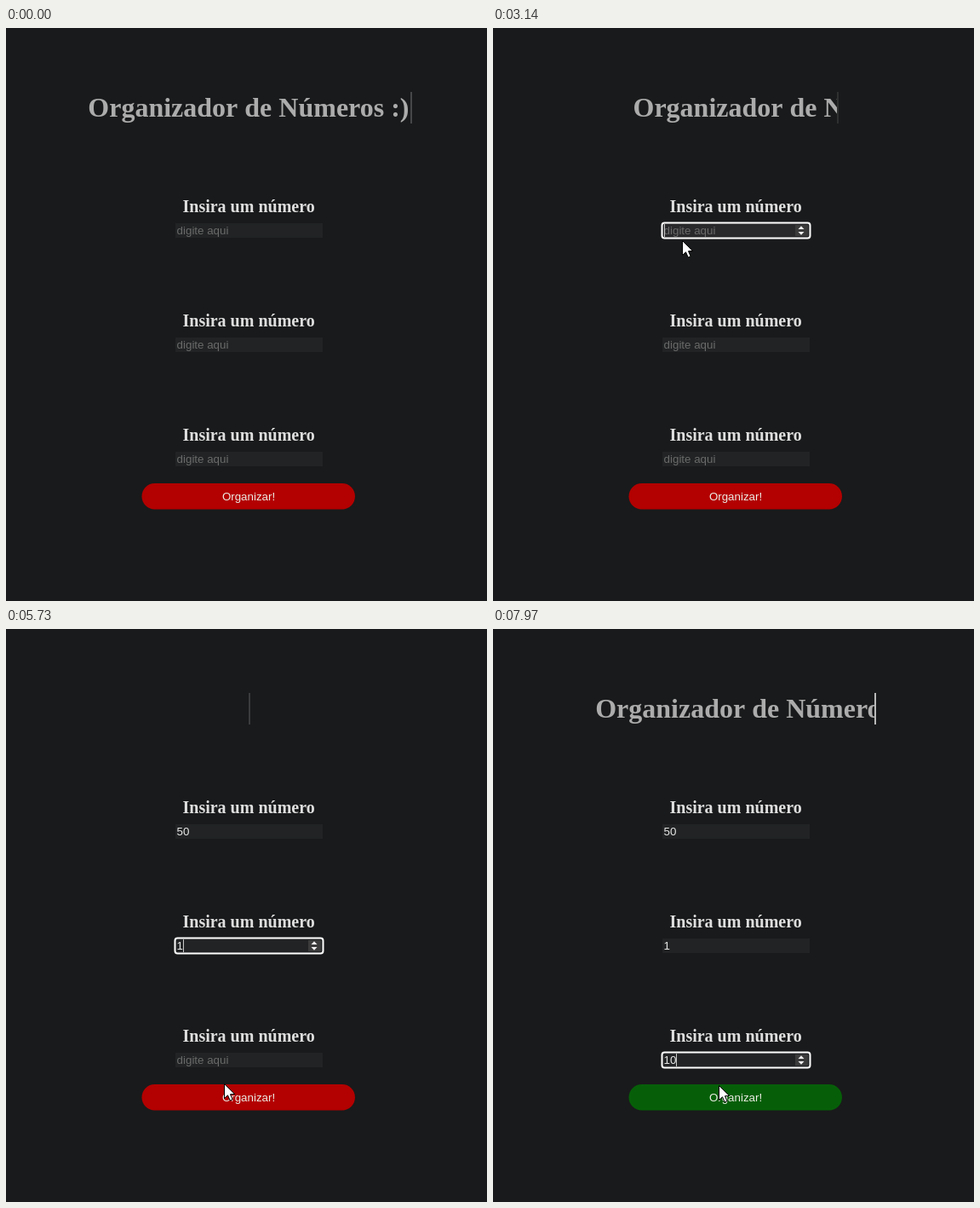
Write an HTML page with a canvas that moves like this. It is 565x672 px and loops after 8000 ms.

```html
<!DOCTYPE html>
<html lang="pt">
<head>
<meta charset="utf-8">
<title>Organizador</title>
<style>
  html, body { margin: 0; width: 100%; height: 100%; overflow: hidden; background: #191a1b; }
  canvas { display: block; }
</style>
</head>
<body>
<canvas id="stage" width="565" height="672"></canvas>
<script>
const ctx = document.getElementById('stage').getContext('2d');
const LOOP = 8000;
const SERIF = '"Liberation Serif", "Times New Roman", serif';
const SANS = '"Liberation Sans", Arial, sans-serif';
const TITLE = 'Organizador de Números :)';
const RED = [179, 0, 0], GREEN = [6, 95, 8];
const MOVE = 500, KEY = 180, FADE = 160;

// where the pointer comes to rest, and when
const STOPS = [
  { at: 0, x: 502, y: 690 },
  { at: 980, x: 215, y: 242 },
  { at: 2400, x: 217, y: 343 },
  { at: 3400, x: 223, y: 234 },
  { at: 4780, x: 243, y: 366 },
  { at: 5400, x: 250, y: 500 },
  { at: 5950, x: 257, y: 536 },
  { at: 7020, x: 246, y: 505 },
  { at: 7650, x: 265, y: 535 }
];

// focus time and what is typed into each field
const FIELDS = [
  { focus: 980, typing: 4080, value: '50' },
  { focus: 4800, typing: 5350, value: '1' },
  { focus: 7080, typing: 7420, value: '10' }
].map((f, i, all) => ({ ...f, y: 229 + 134 * i, blur: i < 2 ? all[i + 1].focus : LOOP }));

const clamp = v => Math.max(0, Math.min(1, v));
const easeOut = k => 1 - (1 - k) ** 3;
const mix = (a, b, k) => Math.round(a + (b - a) * k);

function text(str, x, y, font, color) {
  ctx.font = font;
  ctx.fillStyle = color;
  ctx.fillText(str, x, y);
}

function rect(x, y, w, h, color) {
  ctx.fillStyle = color;
  ctx.fillRect(x, y, w, h);
}

function rounded(x, y, w, h, r) {
  ctx.beginPath();
  ctx.roundRect(x, y, w, h, r);
}

function poly(points, color) {
  ctx.beginPath();
  points.forEach(([x, y]) => ctx.lineTo(x, y));
  ctx.closePath();
  ctx.fillStyle = color;
  ctx.fill();
}

// playback runs slightly slower than the 15 ticks per second of the page
function pageTime(t) {
  return Math.floor(Math.min(t / 66.9, (t + 80) / 70)) * 1000 / 15;
}

// 30 steps: type for 60 %, hold to 80 %, erase to 90 %, then empty
function typedSteps(s) {
  const p = ((s + 2460) % 4000) / 4000;
  if (p < 0.6) return Math.floor(p * 50);
  if (p < 0.8) return 30;
  return Math.max(0, 30 - Math.floor((p - 0.8) * 300));
}

function drawTitle(t) {
  const s = pageTime(t);
  const n = typedSteps(s);
  ctx.font = 'bold 32px ' + SERIF;
  const slack = Math.max(0, n * 380 / 30 - ctx.measureText(TITLE).width);
  const left = 284.8 - 6.33 * n + slack / 2;
  const caret = Math.round(284.6 + 6.3 * n + slack / 2);
  ctx.save();
  ctx.beginPath();
  ctx.rect(left, 70, caret - left, 50);
  ctx.clip();
  text(TITLE, left, 104, ctx.font, '#acacac');
  ctx.restore();
  const alpha = 0.75 * (1 - ((s + 370) % 500) / 500);
  rect(caret, 75, 2, 37, `rgba(255,255,255,${alpha})`);
}

function drawSpinner(y) {
  rect(355, y + 2, 15, 13, '#3b3b3b');
  for (const side of [-1, 1]) {
    const base = y + 8.5 + side * 1.5;
    poly([[358.5, base], [362, base + side * 3.7], [365.5, base]], '#f2f2f2');
  }
}

function drawField({ y, focus, blur, typing, value }, t) {
  const focused = t >= focus && t < blur;
  const count = Math.min(value.length, Math.max(0, Math.floor((t - typing) / KEY) + 1));
  const shown = value.slice(0, count);

  text('Insira um número', 207.5, y - 13, 'bold 20px ' + SERIF, '#dedede');
  rect(199, y, 173, 17, focused && !count ? '#29292c' : '#212324');
  if (focused) drawSpinner(y);
  text(shown || 'digite aqui', 200.6, y + 13, '13.333px ' + SANS, count ? '#e6e6e6' : '#6a6a6a');
  if (!focused) return;

  rounded(198.5, y - 0.5, 174, 18, 3);
  ctx.lineWidth = 2;
  ctx.strokeStyle = '#fff';
  ctx.stroke();
  const lastInput = count ? typing + (count - 1) * KEY : focus;
  if ((t - lastInput) % 1060 < 530) rect(201 + Math.round(count * 7.2), y + 1, 1, 15, '#c8c8c8');
}

function pointerAt(t) {
  const i = Math.max(1, STOPS.findLastIndex(s => t >= s.at - MOVE));
  const a = STOPS[i - 1], b = STOPS[i];
  const k = easeOut(clamp((t - b.at + MOVE) / MOVE));
  return [mix(a.x, b.x, k), mix(a.y, b.y, k)];
}

function onButton(t) {
  const [x, y] = pointerAt(t);
  return x >= 160 && x < 410 && y >= 534 && y < 564;
}

function drawButton(t) {
  // share of the last moments spent on the button gives the colour fade
  let k = 0;
  for (let i = 0; i < 16; i++) k += onButton(t - i * FADE / 16) / 16;
  rounded(159.5, 534, 250.5, 30.4, 15.2);
  ctx.fillStyle = `rgb(${RED.map((v, i) => mix(v, GREEN[i], k))})`;
  ctx.fill();
  text('Organizar!', 253.9, 554, '13.333px ' + SANS, '#ecece4');
}

function drawBeam(x, y) {
  rect(x, y - 7, 1, 15, '#dcdcdc');
  for (const dy of [-8, 8]) {
    rect(x - 3, y + dy, 3, 1, '#dcdcdc');
    rect(x + 1, y + dy, 3, 1, '#dcdcdc');
  }
}

function drawArrow(x, y) {
  const shape = [[0, 0], [0, 17], [4, 13.3], [6.7, 19.5], [9.6, 18.2], [7, 12.2], [12.2, 12]];
  poly(shape.map(([dx, dy]) => [x + dx + 0.5, y + dy + 0.5]), '#fff');
  ctx.lineWidth = 1;
  ctx.strokeStyle = '#000';
  ctx.stroke();
}

function drawPointer(t) {
  const [x, y] = pointerAt(t);
  if (FIELDS.some(f => t >= f.focus - 30 && t < f.focus + 100)) {
    ctx.beginPath();
    ctx.arc(x - 2, y - 1, 12, 0, 2 * Math.PI);
    ctx.fillStyle = 'rgba(196,188,10,0.72)';
    ctx.fill();
  }
  const overText = FIELDS.some(f =>
    (x > 198 && x < 373 && y >= f.y - 1 && y < f.y + 18) ||
    (x > 160 && x < 410 && y > f.y - 30 && y < f.y - 7));
  (overText ? drawBeam : drawArrow)(x, y);
}

function draw(t) {
  rect(0, 0, 565, 672, '#191a1b');
  drawTitle(t);
  FIELDS.forEach(f => drawField(f, t));
  drawButton(t);
  drawPointer(t);
}

const start = performance.now();
function tick() {
  draw((performance.now() - start) % LOOP);
  requestAnimationFrame(tick);
}
tick();
</script>
</body>
</html>
```
